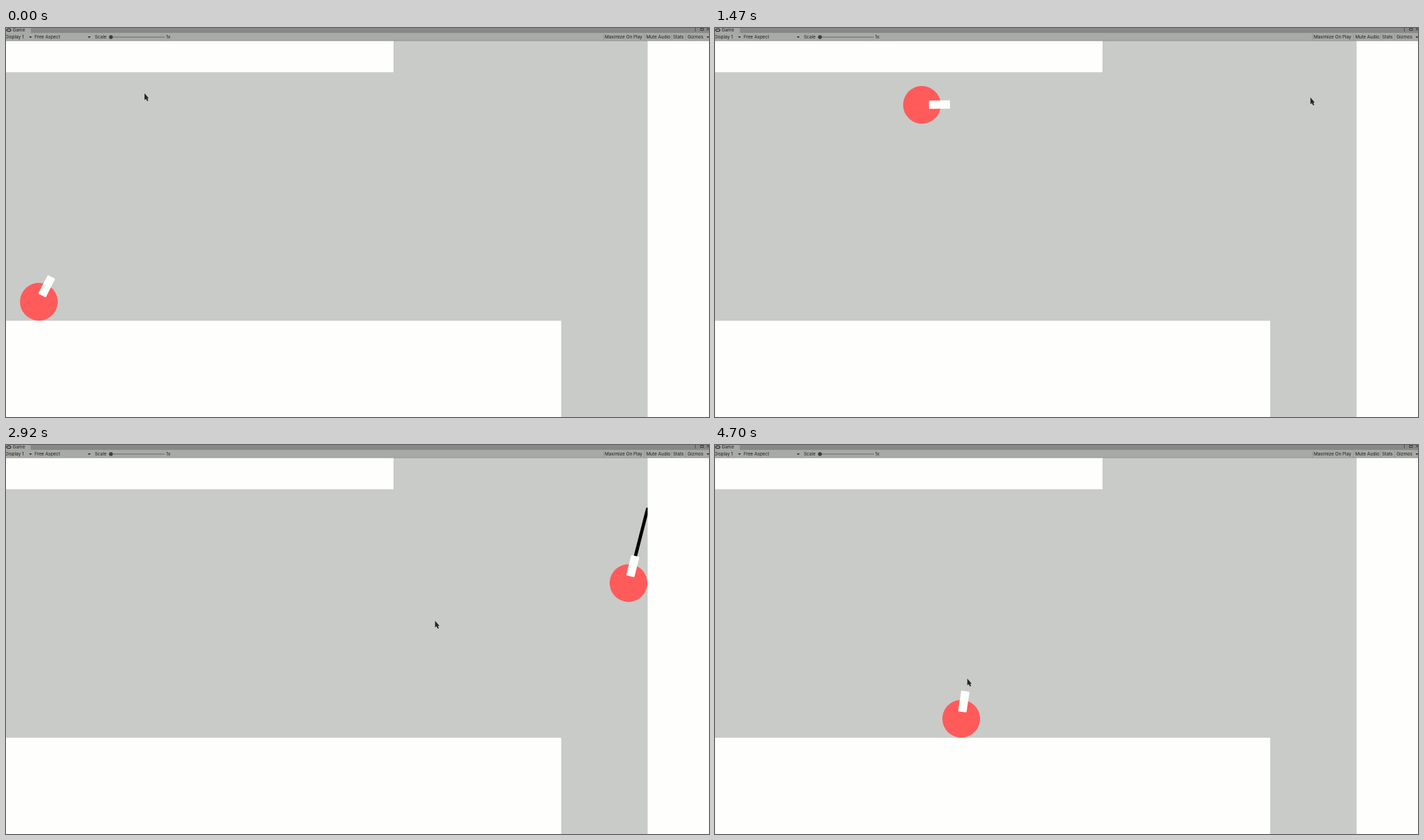
Write an HTML page that moves like this. It is 1005 px wide and 557 px high and loops after 4800 ms.

```html
<!DOCTYPE html>
<html lang="en">
<head>
<meta charset="utf-8">
<title>Grappling hook</title>
<style>
  html, body { margin: 0; width: 100%; height: 100%; overflow: hidden; background: #c9cbc8; }
  svg { display: block; width: 1005px; height: 557px; }
  text { font: 6.4px Inter, Roboto, sans-serif; fill: #1c1d1c; }
</style>
</head>
<body>
<svg viewBox="0 0 1005 557">
  <rect width="1005" height="557" fill="#c9cbc8"/>
  <path id="rope" fill="none" stroke="#000" stroke-linecap="round" stroke-linejoin="round"/>
  <g id="player">
    <circle r="27" fill="#ff5b5b"/>
    <rect x="10" y="-6" width="30" height="12" rx="1.2" fill="#fefefd"/>
  </g>
  <g fill="#fefefd">
    <rect y="18" width="554" height="45.3"/>
    <rect y="419.2" width="793.7" height="138"/>
    <rect x="917.3" y="18" width="88" height="539"/>
  </g>

  <rect width="1005" height="7.5" fill="#868985"/>
  <rect width="35.5" height="8" fill="#a5a8a4"/>
  <rect y="7.5" width="1005" height="10.7" fill="#a7aaa6"/>
  <path d="M0 18.2H1005" stroke="#858884" stroke-width=".7"/>
  <path d="M854.5 8V18M912.8 8V18M951.8 8V18M971.5 8V18" stroke="#8d908c" stroke-width=".7"/>
  <g fill="none" stroke="#2b2c2b">
    <rect x="1" y="1.4" width="6" height="3.2" rx="1.6" stroke-width="1.3"/>
    <path d="M150 13H227" stroke="#555754" stroke-width=".8"/>
    <rect x="993" y=".5" width="4" height="3" stroke-width=".8"/>
    <path d="M1002 0l3 3.5M1005 0l-3 3.5" stroke-width=".8"/>
    <path d="M985.5 0V4.5" stroke-dasharray="1 .8"/>
  </g>
  <circle cx="150" cy="13" r="2.7" fill="#3c3d3c"/>
  <path d="M33 12h4l-2 2.4zM117 12h4l-2 2.4zM1001.5 12h4l-2 2.4z" fill="#2f302f"/>
  <text x="9.5" y="5.3">Game</text>
  <text x="-1" y="15.4">Display 1</text>
  <text x="41" y="15.4">Free Aspect</text>
  <text x="127" y="15.4">Scale</text>
  <text x="229" y="15.4">1x</text>
  <text x="856" y="15.4">Maximize On Play</text>
  <text x="915.2" y="15.4">Mute Audio</text>
  <text x="953.7" y="15.4">Stats</text>
  <text x="974.3" y="15.4">Gizmos</text>

  <path id="cursor" fill="#2a2224" d="M0 -.5V9L2 7.4L3.8 10.8L5.4 10L4 6.8H6.2Z"/>
</svg>
<script>
const LOOP = 4800, STRAIGHTEN = 140, BARREL = 39;

const linear = u => u;
const speedUp = u => u * u;
const slowDown = u => u * (2 - u);
const smooth = u => u * u * (3 - 2 * u);
const clamp = v => Math.max(0, Math.min(1, v));
const mix = (a, b, u) => a + (b - a) * u;

// A move ends at x, y; each axis has its own easing
const move = (end, x, y, easeX = linear, easeY = easeX) => ({ end, x, y, easeX, easeY });

const ballMoves = [
  move(430, 47, 392),
  move(1010, 236, 82, smooth),              // pulled to the ceiling
  move(1880, 349, 182, linear, speedUp),    // free fall
  move(2240, 578, 238, speedUp, linear),    // pulled to the wall
  move(2560, 890, 270, linear, slowDown),
  move(2920, 890, 198, linear, speedUp),    // up along the wall
  move(3500, 845, 97, linear, slowDown),    // thrown off
  move(3960, 664, 176, speedUp),            // pulled to the ground
  move(4320, 395, 392),
  move(4680, 352, 392, slowDown)            // rolls out
];
const mouseMoves = [
  move(420, 198, 94),
  move(1010, 550, 114, speedUp),
  move(1500, 852.3, 100, slowDown),
  move(2240, 850, 102),
  move(2920, 614.5, 251.5, speedUp),
  move(3400, 354, 409, slowDown),
  move(3960, 352.5, 409),
  move(4680, 360.7, 335, smooth)
];
const hooks = [
  { fire: 130, hit: 330, drop: 930, x: 216, y: 63 },
  { fire: 1740, hit: 1968, drop: 2950, x: 917, y: 92 },
  { fire: 3500, hit: 3720, drop: 4480, x: 331, y: 419 }
];

function place(moves, t) {
  const i = moves.findIndex(m => t < m.end);
  if (i < 0) return moves[moves.length - 1];
  if (i === 0) return moves[0];
  const from = moves[i - 1], to = moves[i];
  const u = (t - from.end) / (to.end - from.end);
  return { x: mix(from.x, to.x, to.easeX(u)), y: mix(from.y, to.y, to.easeY(u)) };
}

const bump = (u, center, width, height) => height * Math.exp(-(((u - center) / width) ** 2));

// Sideways offset of the loose rope at share u of its length
const wave = u =>
  bump(u, .06, .05, 10) + bump(u, .21, .045, -14) + bump(u, .32, .11, 10) +
  bump(u, .68, .128, -30) + bump(u, .93, .05, 11);

const [rope, player, cursor] = ['rope', 'player', 'cursor'].map(id => document.getElementById(id));

function drawRope(hook, tip, t) {
  const dx = hook.x - tip.x, dy = hook.y - tip.y, len = Math.hypot(dx, dy) || 1;
  const reach = clamp((t - hook.fire) / (hook.hit - hook.fire));
  const slack = 1 - clamp((t - hook.hit) / STRAIGHTEN);
  const steps = slack ? 100 : 1;
  let d = '';
  for (let i = 0; i <= steps; i++) {
    const u = i / steps, off = slack * wave(u) / len;
    const x = tip.x + dx * u * reach - dy * off;
    const y = tip.y + dy * u * reach + dx * off;
    d += `${i ? 'L' : 'M'}${x.toFixed(2)} ${y.toFixed(2)}`;
  }
  rope.setAttribute('d', d);
  rope.setAttribute('stroke-width', Math.min(9.3, 2 + len * .038));
}

function draw(t) {
  const ball = place(ballMoves, t), mouse = place(mouseMoves, t);
  const hook = hooks.find(h => t >= h.fire && t < h.drop);
  const aim = hook || mouse;
  const angle = Math.atan2(aim.y - ball.y, aim.x - ball.x);
  player.setAttribute('transform',
    `translate(${ball.x} ${ball.y}) rotate(${angle * 180 / Math.PI})`);
  cursor.setAttribute('transform', `translate(${mouse.x} ${mouse.y})`);
  if (hook) {
    const tip = { x: ball.x + BARREL * Math.cos(angle), y: ball.y + BARREL * Math.sin(angle) };
    drawRope(hook, tip, t);
  } else {
    rope.setAttribute('d', '');
  }
}

const start = performance.now();
function tick() {
  draw((performance.now() - start) % LOOP);
  requestAnimationFrame(tick);
}
tick();
</script>
</body>
</html>
```
